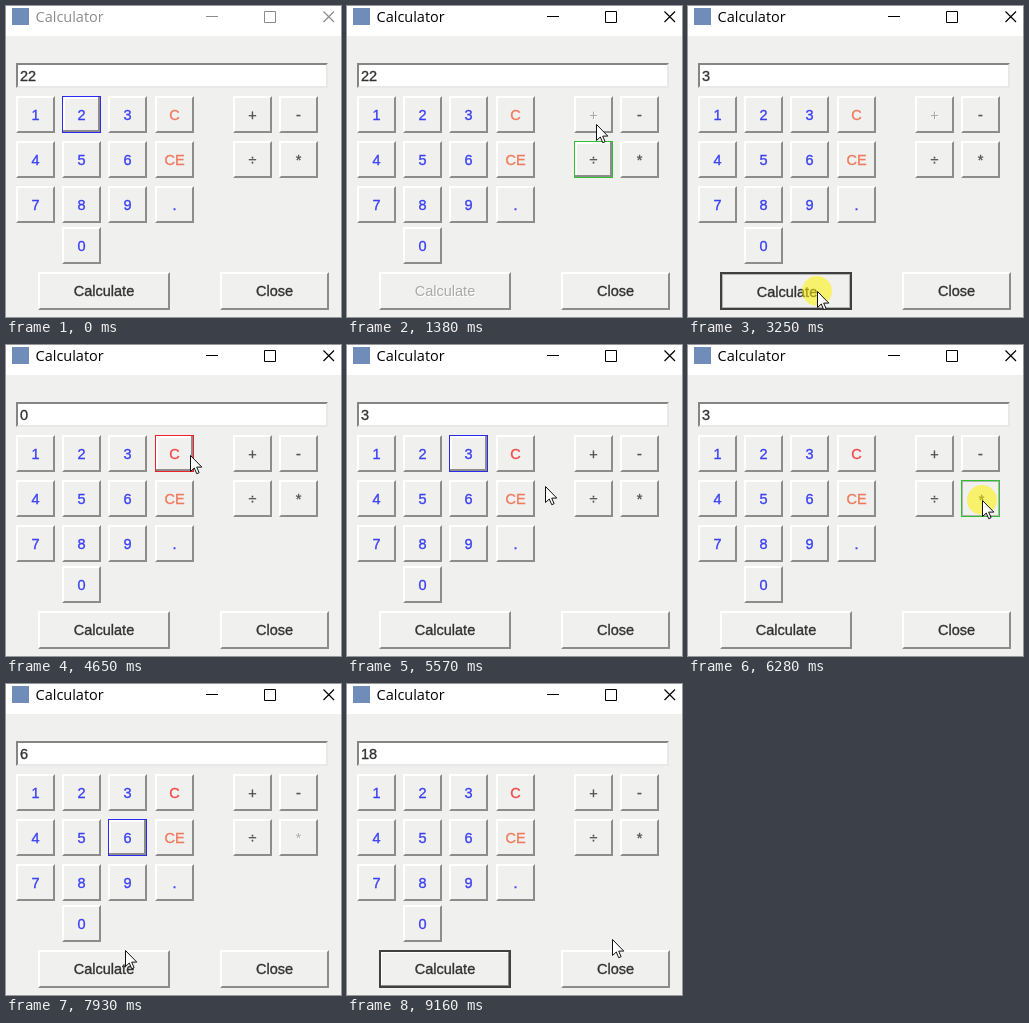
Recreate the animation shown at these times as an HTML page. Size 335 by 311 pixels, loop 9310 ms.

```html
<!DOCTYPE html>
<html lang="en">
<head>
<meta charset="utf-8">
<title>Calculator</title>
<style>
  html, body { margin: 0; width: 100%; height: 100%; overflow: hidden; }
  body { position: relative; background: #f0f0ef; font: 14.5px "Liberation Sans", Arial, sans-serif; }
  body > * { position: absolute; box-sizing: border-box; }
  #bar { left: 0; top: 0; width: 335px; height: 30px; background: #fff; color: #000; }
  #bar.idle { color: #8c8c8c; }
  #bar svg { display: block; }
  #bar text { font: 14.5px "Open Sans", sans-serif; fill: currentColor; }
  #field, .button { -webkit-text-stroke: .35px currentColor; }
  #field {
    left: 10px; top: 57px; width: 312px; height: 25px; padding-left: 2px;
    background: #fff; color: #333; line-height: 22px;
    border: 2px solid; border-color: #858585 #e8e8e8 #e8e8e8 #858585;
  }
  .button {
    display: flex; align-items: center; justify-content: center;
    border: 2px solid; border-color: #fff #8c8c8c #8c8c8c #fff;
    color: var(--ink); white-space: pre;
  }
  .focus {
    border: 1px solid var(--ring);
    box-shadow: inset -2px -2px #8c8c8c, inset 2px 2px #fff;
  }
  .focus.wide { border-width: 2px; box-shadow: inset -1px -1px #8c8c8c, inset 1px 1px #fff; }
  .focus.press { box-shadow: inset 0 0 0 1px #b4b4b4; }
  .press span { transform: translate(1px, 1px); }
  .off { color: #a9a9a9; text-shadow: 1px 1px #fff; -webkit-text-stroke-width: 0; }
  #pointer { left: 0; top: 0; overflow: visible; }
</style>
</head>
<body>
<div id="bar">
  <svg width="335" height="30" fill="none" stroke="currentColor">
    <rect x="6" y="2" width="17" height="17" fill="#6f8db8" stroke="none"/>
    <text x="29.5" y="16" stroke="none">Calculator</text>
    <path d="M200 10.5H212M258.5 5.5H269.5V16.5H258.5Z"/>
    <path d="M317.5 5.5L328 16M328 5.5L317.5 16" stroke-width="1.2"/>
  </svg>
</div>
<div id="field"></div>
<svg id="pointer" width="1" height="1">
  <circle id="glow" r="15" fill="#fff200" fill-opacity=".55"/>
  <path d="M.5 .5V16.5L4.3 13L6.7 18.7L9.1 17.7L6.7 12.1H11.8Z" fill="#fff" stroke="#111"/>
</svg>
<script>
const LOOP = 9310;
const $ = id => document.getElementById(id);
const bar = $('bar'), field = $('field'), pointer = $('pointer'), glow = $('glow');
const buttons = {};

function addButton(label, x, y, ink, ring, w = 39, h = 37) {
  const el = document.createElement('div');
  el.innerHTML = `<span>${label}</span>`;
  el.style.cssText = `left:${x}px;top:${y}px;width:${w}px;height:${h}px;--ink:${ink};--ring:${ring}`;
  document.body.insertBefore(el, pointer);
  buttons[label] = el;
}

const columns = [10, 56, 102, 149, 227, 273], rows = [90, 135, 180, 221];
['123C+-', '456E÷*', '789.', ' 0'].forEach((row, r) => [...row].forEach((key, c) => {
  if (key === ' ') return;
  const label = key === 'E' ? 'CE' : key;
  const [ink, ring] = c > 3 ? ['#555', '#2fc02f']
    : /[CE]/.test(key) ? ['#ee7a5c', '#f0202a'] : ['#3a40f4', '#2a2af0'];
  addButton(label, columns[c], rows[r], ink, ring);
}));
addButton('Calculate', 32, 266, '#333', '#404040', 132, 38);
addButton('Close', 214, 266, '#333', '#404040', 109, 38);

// Window state: each entry overrides the ones before it.
const press = key => ({ focus: key, press: key });
const release = (value, off = [], more) => ({ press: '', value, off, ...more });
const events = [
  [0, { ...release('22'), focus: '2', active: false, cInk: '#ee7a5c' }],
  [1230, { ...press('+'), active: true }],
  [1380, release('22', ['+', 'Calculate'], { focus: '÷' })],
  [2300, press('3')],
  [2530, release('3', ['+'])],
  [3250, press('Calculate')],
  [3480, release('25')],
  [4420, { ...press('C'), cInk: '#f4484a' }],
  [4650, release('0')],
  [5000, press('3')],
  [5230, release('3')],
  [6280, press('*')],
  [6500, release('3', ['*', 'Calculate'], { focus: 'C' })],
  [6990, press('6')],
  [7140, release('6', ['*'])],
  [8240, press('Calculate')],
  [8390, release('18')]
];

// Pointer moves: first step, last step, number of steps, destination.
const moves = [
  [70, 70, 1, 68, 243],
  [190, 670, 5, 228, 88],
  [790, 910, 2, 249, 118],
  [1610, 2070, 4, 125, 112],
  [2650, 3020, 4, 129, 285],
  [3600, 4180, 5, 184, 110],
  [4870, 4870, 1, 125, 112],
  [5380, 5650, 3, 223, 151],
  [5800, 6160, 4, 294, 155],
  [6600, 6820, 3, 126, 158],
  [7260, 7930, 6, 119, 266],
  [8540, 9160, 4, 265, 255]
];

function pointerAt(t) {
  let x = 68, y = 243;
  for (const [start, end, steps, toX, toY] of moves) {
    if (t < start) break;
    const step = t >= end ? steps : 1 + Math.floor((t - start) / (end - start) * (steps - 1));
    const p = step / steps, eased = p * p * (3 - 2 * p);
    x += (toX - x) * eased;
    y += (toY - y) * eased;
  }
  return [Math.round(x), Math.round(y)];
}

function render(t) {
  const state = Object.assign({}, ...events.filter(([at]) => at <= t).map(([, change]) => change));
  bar.className = state.active ? '' : 'idle';
  field.textContent = state.value;
  buttons.C.style.setProperty('--ink', state.cInk);
  for (const [label, el] of Object.entries(buttons)) {
    el.className = ['button',
      label.length > 2 && 'wide',
      state.focus === label && 'focus',
      state.press === label && 'press',
      state.off.includes(label) && 'off'].filter(Boolean).join(' ');
  }
  const [x, y] = pointerAt(t);
  pointer.style.transform = `translate(${x}px, ${y}px)`;
  pointer.style.display = t < 70 ? 'none' : '';
  glow.style.display = state.press ? '' : 'none';
}

const begin = performance.now();
function tick() {
  render((performance.now() - begin) % LOOP);
  requestAnimationFrame(tick);
}
tick();
</script>
</body>
</html>
```
